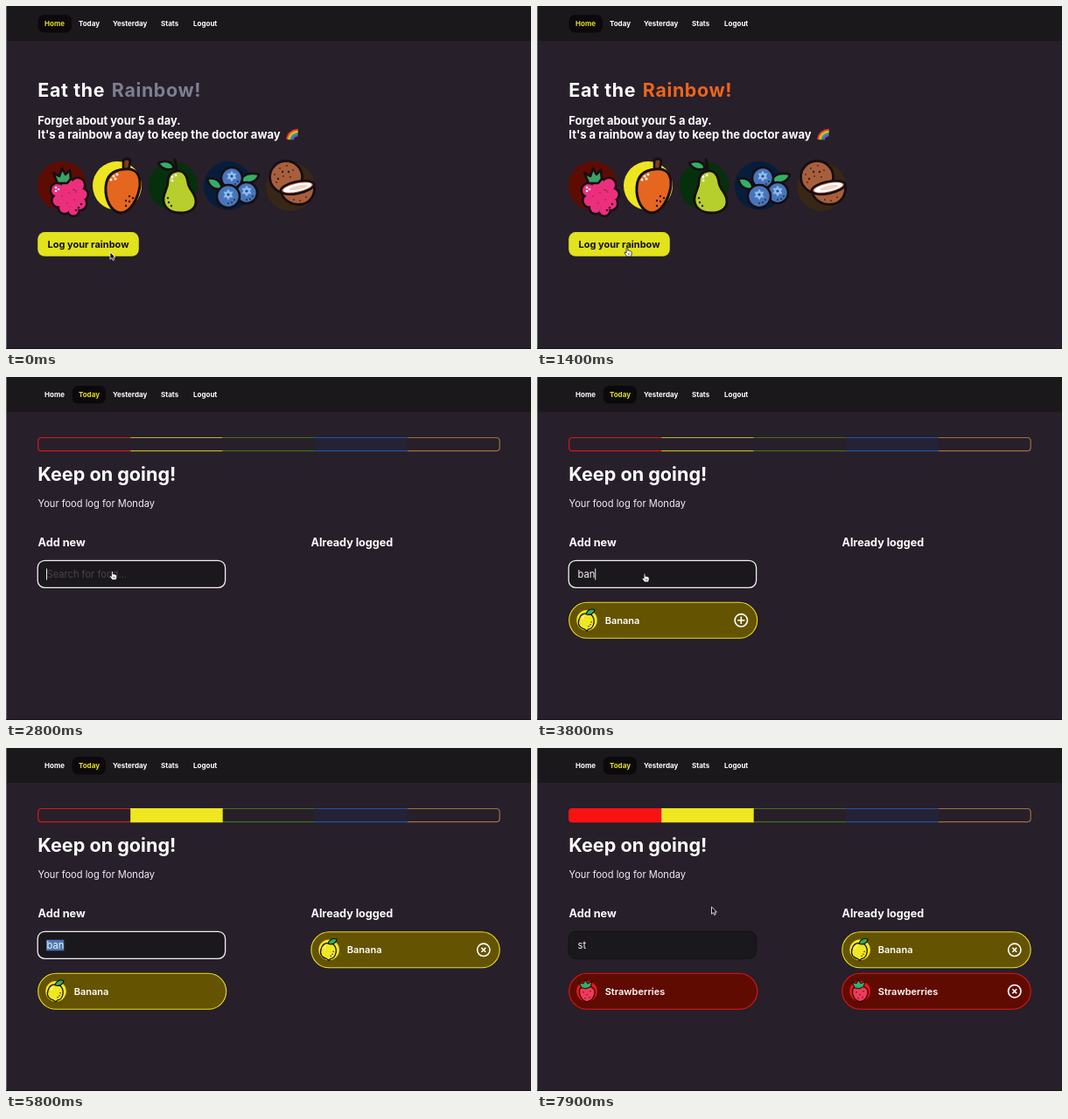
An HTML page for the animation above (8000 ms loop, 600x393 px).

```html
<!DOCTYPE html>
<html lang="en">
<head>
<meta charset="utf-8">
<title>Eat the Rainbow</title>
<style>
html, body { margin: 0; width: 100%; height: 100%; overflow: hidden; background: #271f2a; }
svg { display: block; width: 600px; height: 393px; }
text { font-family: Inter, "Open Sans", sans-serif; fill: #fff; white-space: pre; }
.wide { letter-spacing: .03em; }
.ink { stroke: #170e14; stroke-width: 2.6; stroke-linejoin: round; stroke-linecap: round; }
</style>
</head>
<body>
<svg id="stage" viewBox="0 0 600 393"></svg>
<script>
const LOOP = 8000, STEP = 100;
const T = {
  page: 1700, bar: 1900, focus: 2800, banana: 4800, select: 5400,
  retype: 5900, berries: 7400
};

const text = (x, y, size, weight, str, extra = '') =>
  `<text x="${x}" y="${y}" font-size="${size}" font-weight="${weight}" ${extra}>${str}</text>`;
const circle = (x, y, r, fill, extra = '') =>
  `<circle cx="${x}" cy="${y}" r="${r}" fill="${fill}" ${extra}/>`;
const oval = (x, y, rx, ry, turn, fill, extra = '') =>
  `<ellipse cx="${x}" cy="${y}" rx="${rx}" ry="${ry}" fill="${fill}" transform="rotate(${turn} ${x} ${y})" ${extra}/>`;
const path = (d, fill, extra = 'class="ink"') => `<path d="${d}" fill="${fill}" ${extra}/>`;
const rect = (x, y, w, h, r, fill, extra = '') =>
  `<rect x="${x}" y="${y}" width="${w}" height="${h}" rx="${r}" fill="${fill}" ${extra}/>`;
const group = (id, body, extra = '') => `<g id="${id}" ${extra}>${body}</g>`;
const dots = (list, r, fill) => list.map(([x, y]) => circle(x, y, r, fill)).join('');

// ---- navigation ----
const navItems = [['Home', 44], ['Today', 83], ['Yesterday', 122], ['Stats', 177], ['Logout', 214]];
function nav() {
  return rect(0, 0, 600, 40, 0, '#1b181c') +
    rect(36.5, 10, 38.5, 20.5, 7, '#0c090d', 'id="navPill"') +
    navItems.map(([s, x], i) => text(x, 23.2, 8, 700, s, `id="nav${i}"`)).join('');
}

// ---- home page fruit ----
function raspberry() {
  const balls = [[59, 211, 7], [71, 206, 7.5], [82, 205, 7], [86, 216, 6.5], [84, 226, 7],
    [77, 234, 5.5], [60, 223, 6.5], [67, 231, 6], [68, 219, 10], [77, 221, 10]];
  const all = extra => balls.map(([x, y, r]) => circle(x, y, r, '#ec2f7c', extra)).join('');
  return circle(64, 206, 28, '#5e0c02') +
    all('stroke="#170e14" stroke-width="5"') + all() +
    path('M59 203 L54 191 L61 195 L64 186 L68 193 L73 188 L74 198 L70 203 Z', '#3aa265') +
    dots([[57, 208], [60, 210], [57, 212]], 1.3, '#fff') +
    dots([[72, 214], [64, 218], [80, 213], [70, 226], [78, 222]], 1, '#c01e60') +
    dots([[83, 231], [86, 227], [80, 234]], 1.3, '#3b1020');
}
function mango() {
  return circle(127, 206, 28, '#efe622') +
    path('M134 189 L134 177 Q138 173 142 177 L140 190 Z', '#7a3f22') +
    path('M135 187 C148 185 154 193 153 206 C151 222 141 237 131 237 C120 236 113 222 114 207 C115 194 123 188 135 187 Z',
      '#e5661f', 'class="ink" style="stroke-width:3"') +
    dots([[123, 195], [127, 193], [120, 199], [125, 198]], 1.5, '#fff') +
    dots([[141, 224], [145, 220], [137, 229], [141, 218], [137, 223]], 1.2, '#2b120c');
}
function pear() {
  return circle(191, 206, 28, '#06300c') +
    path('M195 190 Q195 182 193 176', 'none', 'class="ink" style="stroke-width:3.2"') +
    path('M192 186 C184 189 178 187 174 180 C182 176 190 178 192 186 Z', '#35ae66') +
    path('M195 189 C204 188 207 195 208 203 C209 210 217 215 217 224 C217 233 209 237 199 237 C187 237 179 230 180 220 C181 212 185 208 185 202 C185 194 188 190 195 189 Z',
      '#b6cf2c', 'class="ink" style="stroke-width:2.8"') +
    dots([[190, 196], [194, 194], [190, 200]], 1.4, '#fff') +
    dots([[186, 225], [189, 229], [185, 220]], 1.2, '#263010');
}
function blueberries() {
  const berry = (x, y, r) => {
    let star = '';
    for (let i = 0; i < 12; i++) {
      const a = i * Math.PI / 6, q = i % 2 ? 3.8 : 6.5;
      star += `${i ? 'L' : 'M'}${x + q * Math.sin(a)} ${y - 2 - q * Math.cos(a)} `;
    }
    return circle(x, y, r, '#4875ba', 'class="ink"') + path(star + 'Z', '#8fbdea', '') +
      circle(x, y - 2, 1.6, '#284a86') +
      dots([[x + 4, y + 7], [x + 7, y + 4], [x, y + 8]], 0.9, '#16243f');
  };
  return circle(254, 206, 28, '#071d3c') +
    path('M247 210 C238 211 232 207 230 198 C239 196 246 200 247 210 Z', '#35ae66') +
    path('M268 201 C270 193 279 190 289 193 C287 201 279 205 268 201 Z', '#35ae66') +
    berry(258, 197, 12) + berry(275, 214, 12) + berry(254, 218, 13);
}
function coconut() {
  return circle(325, 207, 28, '#382617') +
    circle(320, 196, 18.5, '#a85f3d', 'class="ink" style="stroke-width:2.8"') +
    dots([[307, 193], [313, 186], [321, 183], [328, 188], [317, 195], [309, 202], [325, 196]], 1, '#55291b') +
    dots([[316, 190], [311, 198], [323, 190]], 1.2, '#3a1b14') +
    path('M314 212 C317 224 328 229 339 227 C350 224 354 214 352 204 Z', '#a85f3d',
      'class="ink" style="stroke-width:2.8"') +
    oval(333, 208, 19.5, 6.8, -12, '#a85f3d', 'class="ink"') +
    oval(333, 208, 16.8, 4.6, -12, '#fff') +
    oval(334, 208, 11, 2.2, -12, '#f0d5c2') +
    dots([[329, 222], [336, 223], [343, 219]], 1, '#55291b');
}
function rainbow() {
  return ['#e8322c', '#f5912a', '#f7e03a', '#48b64a', '#3a86e0', '#8e4fc4'].map((c, i) => {
    const r = 12.2 - i * 1.45;
    return path(`M${333.4 - r} 153.4 A${r} ${r} 0 0 1 333.4 ${153.4 - r}`, 'none', `stroke="${c}" stroke-width="1.5"`);
  }).join('');
}
function home() {
  return text(36.3, 104.3, 21.4, 700, 'Eat the', 'class="wide"') +
    text(120.8, 104.3, 21.4, 700, 'Rainbow!', 'class="wide" id="word"') +
    text(36.3, 136.4, 12.9, 700, 'Forget about your 5 a day.') +
    text(36.3, 152.4, 13, 700, "It's a rainbow a day to keep the doctor away") +
    `<g transform="rotate(4 328 148)">${rainbow()}</g>` +
    raspberry() + mango() + pear() + blueberries() + coconut() +
    rect(36.2, 259.1, 115.6, 27.7, 8, '#e2e21d') +
    text(47.5, 277.1, 11, 700, 'Log your rainbow', 'style="fill:#130e14"');
}

// ---- today page ----
const kinds = {
  red: { fill: '#600b02', line: '#e41515' },
  yellow: { fill: '#645300', line: '#e9e01f' },
  green: { fill: '#05290b', line: '#4f8215' },
  blue: { fill: '#071f42', line: '#2767b8' }
};
const icons = {
  yellow: circle(0, 0, 11.8, '#f0e722') +
    path('M-1 -8 C5 -9 9 -3 8 3 C7 8 4 10 2 10 L0 12 L-3 10 C-8 9 -11 5 -9 -1 C-8 -5 -5 -8 -1 -8 Z', '#f0e722',
      'stroke="#171208" stroke-width="1.3"') +
    path('M-1 -7 C0 -12 5 -14 9 -12 C8 -8 4 -5 -1 -7 Z', '#35ae66', 'stroke="#171208" stroke-width="1.2"') +
    dots([[4, 5], [5, 2], [2, 7]], 0.7, '#171208') + dots([[-5, -2], [-4, -4]], 0.8, '#fff'),
  red: circle(0, 0, 11.8, '#f01616') +
    path('M-8 -3 C-3 -8 6 -7 9 -1 C10 5 6 11 0 12 C-6 11 -10 4 -8 -3 Z', '#ee3b5a',
      'stroke="#250a0c" stroke-width="1.3"') +
    path('M-6 -4 L-9 -10 L-4 -9 L-2 -13 L1 -9 L6 -11 L4 -5 L-1 -3 Z', '#35ae66',
      'stroke="#250a0c" stroke-width="1.1"') +
    dots([[-4, 1], [0, 4], [4, 0], [3, 7], [-2, 8]], 0.7, '#3c0d14'),
  green: circle(0, 0, 11.8, '#6f9f14') +
    path('M-2 -11 C4 -12 5 -5 7 -1 C11 5 8 12 1 12 C-6 12 -9 6 -7 0 C-6 -5 -7 -10 -2 -11 Z', '#e3dc5a',
      'stroke="#17200a" stroke-width="1.8"') +
    circle(1, 5, 3.8, '#a3482c', 'stroke="#17200a" stroke-width="1.1"') + circle(0, 4, 0.8, '#fff'),
  blue: circle(0, 0, 11.8, '#2a6cc4') +
    circle(0, 1, 8.5, '#4875ba', 'stroke="#0b1424" stroke-width="1.4"') + circle(1, -1, 3.2, '#93bfeb')
};
function item(x, y, w, kind, name, sign, signId = '') {
  const k = kinds[kind], turn = sign === 'x' ? 'rotate(45)' : '', a = sign === 'x' ? 3.4 : 4.2;
  const button = `<g transform="translate(${x + w - 18.4} ${y + 20.5})" fill="none" stroke="#fff" stroke-width="1.6">` +
    `<circle r="7.2"/><path transform="${turn}" d="M${-a} 0H${a}M0 ${-a}V${a}"/></g>`;
  return rect(x, y, w, 41, 20.5, k.fill, `stroke="${k.line}" stroke-width="1.1"`) +
    `<g transform="translate(${x + 20.3} ${y + 20.5})">${icons[kind]}</g>` +
    text(x + 41, y + 24.4, 11, 600, name) + group(signId, button);
}
const found = (row, kind, name, signId) => item(36.7, 258.3 + row * 47.2, 215, kind, name, '+', signId);
const logged = (row, kind, name) => item(348.8, 210.8 + row * 47.4, 215.4, kind, name, 'x');

function bar() {
  const w = 105.5, x0 = 36.7, end = x0 + 5 * w, top = 69.5, low = 84.7;
  const lines = ['#d51a1a', '#bdb51e', '#42701a', '#1f549f', '#a0713f'];
  const at = i => x0 + i * w;
  const edge = (d, c) => path(d, 'none', `stroke="${c}" stroke-width="1.2"`);
  let out = rect(at(3), top, w, low - top, 0, '#262236');
  lines.forEach((c, i) => {
    if (i === 0) out += edge(`M${at(1)} ${top}H${x0 + 4}Q${x0} ${top} ${x0} ${top + 4}V${low - 4}Q${x0} ${low} ${x0 + 4} ${low}H${at(1)}`, c);
    else if (i === 4) out += edge(`M${at(4)} ${top}H${end - 4}Q${end} ${top} ${end} ${top + 4}V${low - 4}Q${end} ${low} ${end - 4} ${low}H${at(4)}`, c);
    else out += edge(`M${at(i)} ${top}H${at(i + 1)}M${at(i)} ${low}H${at(i + 1)}`, c);
  });
  out += path(`M${at(1)} 69H${x0 + 3.5}Q${x0 - .5} 69 ${x0 - .5} 73V81.2Q${x0 - .5} 85.2 ${x0 + 3.5} 85.2H${at(1)}Z`, '#f91212', 'id="redFill"');
  return out + rect(at(1), 69, w, 16.2, 0, '#efe720', 'id="yellowFill"');
}
function today() {
  return group('bar', bar()) +
    text(36.3, 119, 21.6, 700, 'Keep on going!') +
    text(36.5, 149.3, 11.1, 400, 'Your food log for Monday', 'style="fill:#f1eef2"') +
    text(36.5, 194.3, 12.7, 700, 'Add new') +
    text(348.5, 194.3, 12.6, 700, 'Already logged') +
    rect(36.2, 210.3, 214.4, 31, 8, '#1b181d', 'id="field"') +
    rect(46, 219.8, 20.3, 12.4, 0, '#4b77b2', 'id="mark"') +
    text(46.5, 230, 11.15, 400, '', 'id="typed"') +
    rect(46, 219.5, 0.9, 13, 0, '#fff', 'id="caret"') +
    group('listB', found(0, 'yellow', 'Banana') + found(1, 'blue', 'Blueberries') + found(2, 'green', 'Broccoli')) +
    group('listBan', found(0, 'yellow', 'Banana', 'plusBan')) +
    group('listS', found(0, 'yellow', 'Apples (yellow)') + found(1, 'yellow', 'Lemons') + found(2, 'green', 'Spinach')) +
    group('listSt', found(0, 'red', 'Strawberries', 'plusSt')) +
    group('logBan', logged(0, 'yellow', 'Banana')) +
    group('logSt', logged(1, 'red', 'Strawberries'));
}

// ---- pointer ----
const pointer =
  group('arrow', path('M0 0V8.2L1.9 6.5L3.2 9.4L4.7 8.7L3.5 5.9H6Z', '#0b0b0b', 'stroke="#fff" stroke-width=".8"')) +
  group('hand', path('M-.9 .6Q0 -.6 .9 .6V3.4Q2 2.8 2.6 3.7Q3.6 3.3 4.1 4.2Q5.2 4 5.2 5.2V7Q5 9 3.8 10H.1Q-1.2 8.6 -2.8 6.2Q-3 4.8 -1.8 5L-.9 6Z', '#fff', 'stroke="#111" stroke-width=".8"') +
    path('M1.3 6V8.4M2.8 6V8.4', 'none', 'stroke="#111" stroke-width=".5"'));

document.getElementById('stage').innerHTML =
  rect(0, 0, 600, 393, 0, '#271f2a') + nav() + group('home', home()) + group('today', today()) +
  rect(0, 0, 1, 393, 0, '#66646a') + rect(0, 392, 600, 1, 0, '#17121a') +
  group('pointer', pointer);

// ---- motion ----
const $ = id => document.getElementById(id);
const show = (id, on) => $(id).setAttribute('visibility', on ? 'inherit' : 'hidden');
const clamp = v => Math.max(0, Math.min(1, v));
const ease = v => v * v * (3 - 2 * v);
const mix = (a, b, k) => a.map((v, i) => v + (b[i] - v) * k);

const route = [[0, 119, 282], [100, 119, 282], [1000, 103, 277], [1800, 103, 277], [2600, 121.5, 222.5],
  [3600, 121.5, 222.5], [3800, 123, 225], [4100, 123, 225], [4700, 233, 277], [4900, 233, 277],
  [5400, 62, 224], [6900, 62, 224], [7300, 233, 277], [7500, 233, 277], [7900, 199.5, 182], [8000, 199.5, 182]];
function place(t) {
  const i = route.findIndex((p, n) => n && t <= p[0]);
  const [a, b] = [route[i - 1], route[i]];
  return mix(a, b, ease((t - a[0]) / (b[0] - a[0]))).slice(1);
}

const typing = [[0, ''], [3400, 'b'], [3500, 'ba'], [3700, 'ban'], [T.retype, 's'], [6400, 'st']];
const caretAt = { '': 46, b: 53.4, ba: 59.6, ban: 66.3, s: 52.6, st: 56.7 };

function draw(t) {
  const within = (a, b) => t >= a && t < b;
  const onToday = t >= T.page;
  $('navPill').setAttribute('x', onToday ? 75.5 : 36.5);
  $('nav0').style.fill = onToday ? '#fff' : '#e6e01f';
  $('nav1').style.fill = onToday ? '#e6e01f' : '#fff';
  show('home', !onToday);
  show('today', onToday);
  const tint = mix([125, 127, 145], [238, 101, 28], clamp(t / 1400));
  $('word').style.fill = `rgb(${tint.map(Math.round)})`;

  $('bar').setAttribute('opacity', clamp((t - T.bar + 100) / 300));
  $('yellowFill').setAttribute('opacity', clamp((t - T.banana) / 300));
  $('redFill').setAttribute('opacity', clamp((t - T.berries) / 300));

  const focused = within(T.focus, T.banana) || within(T.select, T.berries);
  $('field').setAttribute('stroke', focused ? '#f2f0f3' : '#131015');
  $('field').setAttribute('stroke-width', focused ? 1.3 : 1);
  const value = typing.filter(k => t >= k[0]).pop()[1];
  const marked = within(T.select, T.retype);
  $('typed').textContent = value || 'Search for food...';
  $('typed').style.fill = value ? '#f4f2f5' : '#48424b';
  $('caret').setAttribute('x', caretAt[value]);
  show('caret', onToday && focused && !marked);
  show('mark', onToday && marked);

  const lists = { listB: [3500, 3700], listBan: [3700, 6200], listS: [6200, 6700], listSt: [6700, LOOP] };
  for (const id in lists) show(id, within(...lists[id]));
  show('plusBan', t < T.banana);
  show('plusSt', t < T.berries);
  show('logBan', t >= T.banana);
  show('logSt', t >= T.berries);

  const [x, y] = place(t);
  $('pointer').setAttribute('transform', `translate(${x} ${y})`);
  const hidden = within(5400, 7000), arrow = t < 300 || within(5000, 5400) || t >= 7600;
  show('arrow', !hidden && arrow);
  show('hand', !hidden && !arrow);
}

function tick() {
  const t = performance.now() % LOOP;
  draw(Math.floor(t / STEP) * STEP);
  requestAnimationFrame(tick);
}
tick();
</script>
</body>
</html>
```
